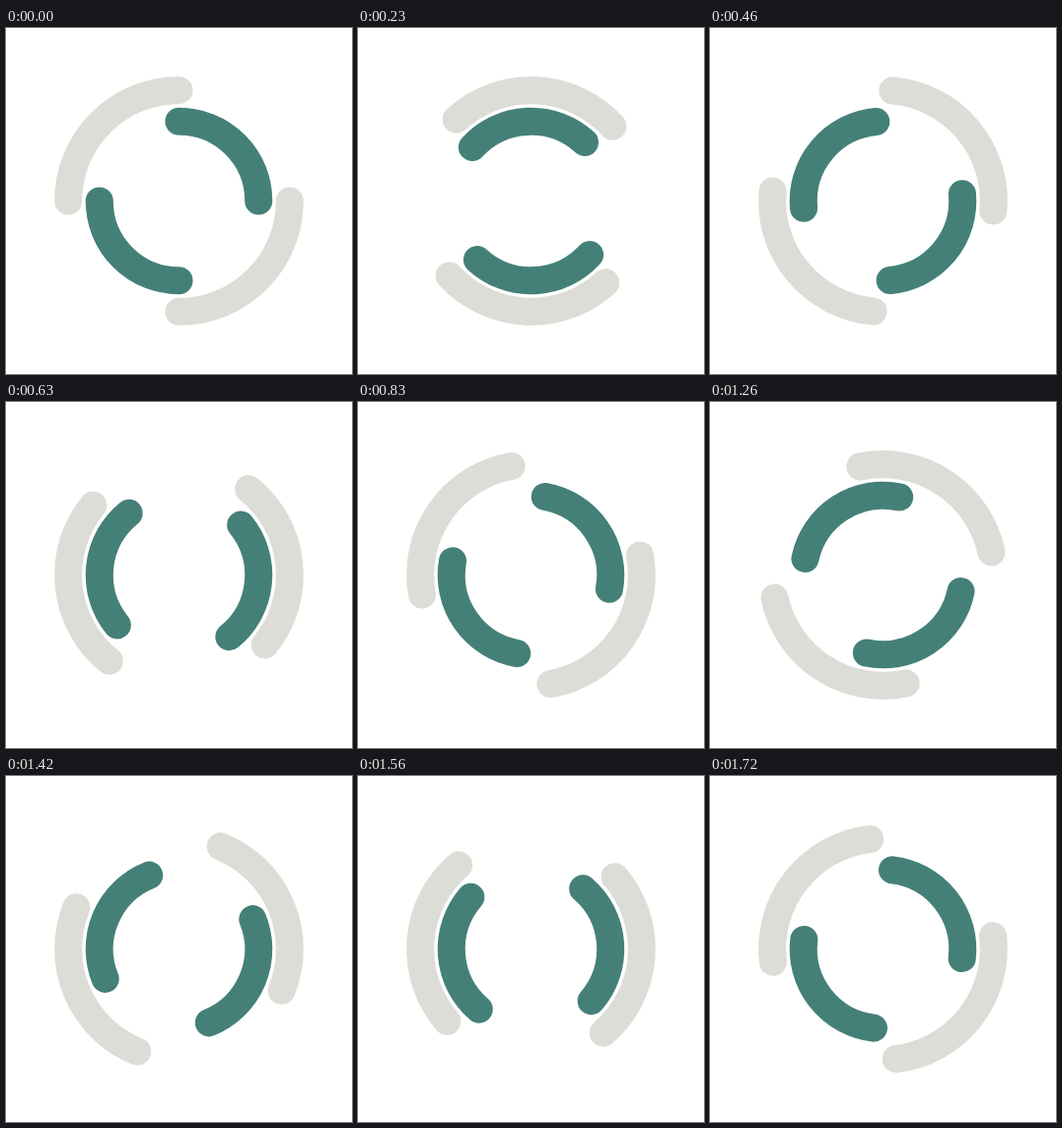
An HTML page for the animation above (1.75 s loop, 351 px wide and 351 px high).

```html
<!DOCTYPE html>
<html lang="en">
<head>
<meta charset="utf-8">
<title>Double ring spinner</title>
<style>
  html, body { margin: 0; width: 100%; height: 100%; overflow: hidden; background: #fff; }
  svg { display: block; width: 100vw; height: 100vh; }
  path { fill: none; stroke-width: 8; stroke-linecap: round; }
  #outer { stroke: #ddddd8; }
  #inner { stroke: #448078; }
</style>
</head>
<body>
<svg viewBox="0 0 100 100">
  <path id="outer" d="M82 50A32 32 0 0 1 50 82M18 50A32 32 0 0 1 50 18"/>
  <path id="inner" d="M50 73A23 23 0 0 1 27 50M50 27A23 23 0 0 1 73 50"/>
</svg>
<script>
  const LOOP = 1750, STEPS = 53;
  const outer = document.getElementById('outer');
  const inner = document.getElementById('inner');

  // Steps last 30 or 40 ms, with the longer ones spread evenly.
  const stepStart = i => 30 * i + 10 * Math.floor((5 * i + 6) / 16);

  const turn = (ring, deg) => ring.setAttribute('transform', `rotate(${deg} 50 50)`);

  function draw(now) {
    const t = now % LOOP;
    let step = 0;
    while (step < STEPS - 1 && stepStart(step + 1) <= t) step++;
    const angle = 360 * step / STEPS;
    turn(outer, angle);
    turn(inner, -angle);
  }

  const origin = performance.now();
  function tick() {
    draw(performance.now() - origin);
    requestAnimationFrame(tick);
  }
  tick();
</script>
</body>
</html>
```
